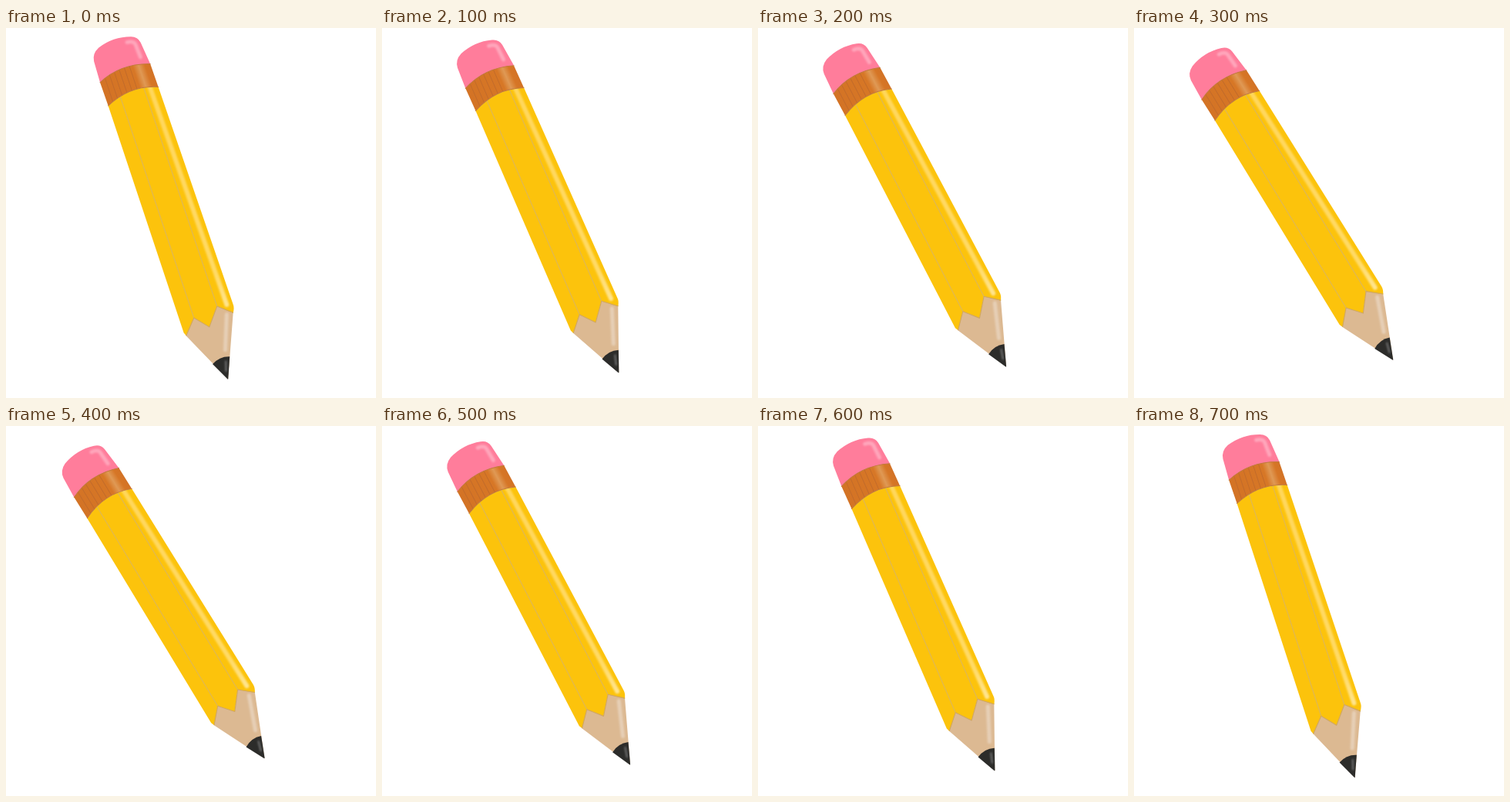
These frames come from a looping animation (480x480 px, 800 ms). An HTML page:

```html
<!DOCTYPE html>
<html lang="en">
<head>
<meta charset="utf-8">
<title>Pencil</title>
<style>
  html, body { margin: 0; width: 100%; height: 100%; overflow: hidden; background: #fff; }
  svg { display: block; width: 100%; height: 100%; }
</style>
</head>
<body>
<svg viewBox="0 0 480 480">
  <defs>
    <linearGradient id="shine" gradientUnits="userSpaceOnUse" x1="0" y1="-155" x2="0" y2="150">
      <stop offset="0" stop-color="#ffd75c"/>
      <stop offset=".85" stop-color="#ffda66"/>
      <stop offset="1" stop-color="#ffe591"/>
    </linearGradient>
    <linearGradient id="metal" gradientUnits="userSpaceOnUse" x1="-25" x2="46" y1="0" y2="0">
      <stop offset="0" stop-color="#d37325"/>
      <stop offset=".66" stop-color="#d77726"/>
      <stop offset=".77" stop-color="#df9955"/>
      <stop offset=".88" stop-color="#d67626"/>
      <stop offset="1" stop-color="#d27226"/>
    </linearGradient>
    <filter id="soft" filterUnits="userSpaceOnUse" x="-60" y="-250" width="140" height="510">
      <feGaussianBlur stdDeviation="1.2"/>
    </filter>
    <clipPath id="inBody"><use href="#body"/></clipPath>
    <clipPath id="inFerrule"><use href="#ferrule"/></clipPath>
  </defs>

  <!-- Drawn upright, with the pivot at the origin -->
  <g id="pencil" stroke-linecap="round" stroke-linejoin="round" fill="none">
    <path fill="#dcb992" d="M-24 168 L-6.8 149.6 L8.4 167.3 L26.4 145 L43.8 159 L9.8 239.3 Z"/>
    <path stroke="#e6cfb6" stroke-width="5" filter="url(#soft)" d="M35 159 L18.5 202"/>

    <path fill="#2c2c2a" d="M-3 214.2 Q9 207.4 21.2 212 L10.2 238.6 Q9.7 239.8 9.1 238.6 Z"/>
    <path stroke="#6b6b6b" stroke-width="2.4" filter="url(#soft)" d="M14.3 216.5 L10.8 228"/>

    <path id="body" fill="#fcc30c" d="M-24.4 -146.5 Q11 -163 45 -149 L47 150 Q47.2 154 43.4 160 L26.4 145 L8.4 167.3 L-6.8 149.6 L-23.6 168.6 L-25.5 164 Z"/>
    <g clip-path="url(#inBody)">
      <path stroke="#e0b850" stroke-width="1.3" d="M-5.8 -152 L-6.8 149.6 M26.7 -154 L26.4 145"/>
      <path stroke="url(#shine)" stroke-width="6" filter="url(#soft)" d="M34.5 -158 L39 147"/>
    </g>
    <path stroke="#d0a660" stroke-width="1.1" d="M-23.4 168 L-6.8 149.6 L8.4 167.3 L26.4 145 L43.4 159.4"/>

    <path fill="#ff7d9b" d="M-24.8 -178.5 L-23.6 -207 Q-22.5 -217.4 -12 -222 Q10 -229.6 32 -222.2 Q40.6 -219.4 41.6 -211 L44.6 -181 Q10 -180 -24.8 -178.5 Z"/>
    <path stroke="#ffa6bb" stroke-width="5" filter="url(#soft)" d="M25 -216.8 Q34 -216.4 34.5 -210.5 L35.4 -193"/>

    <path id="ferrule" fill="url(#metal)" d="M-24.8 -178.5 Q8 -193.6 44.6 -180.6 L45 -149 Q11 -163 -24.4 -146.5 Z"/>
    <g id="ridges" clip-path="url(#inFerrule)" stroke="#c26b2a" stroke-width="1"></g>
    <path stroke="#c07a3c" stroke-width="1" d="M-24.8 -178.5 Q8 -193.6 44.6 -180.6 M-24.4 -146.5 Q11 -163 45 -149"/>
  </g>
</svg>
<script>
  const PIVOT = [202.5, 232];
  const STEP = 100;
  const ANGLES = [18.6, 23.6, 27.6, 31.6, 31.4, 27.6, 23.6, 18.2];

  const pencil = document.getElementById("pencil");
  const ridges = document.getElementById("ridges");

  for (let x = -17; x <= 18; x += 7) {
    const line = document.createElementNS("http://www.w3.org/2000/svg", "path");
    line.setAttribute("d", `M${x} -192 V-142`);
    ridges.append(line);
  }

  function draw(time) {
    const pose = Math.floor(time / STEP) % ANGLES.length;
    pencil.setAttribute("transform", `translate(${PIVOT}) rotate(${-ANGLES[pose]})`);
  }

  let start;
  function tick(now) {
    start ??= now;
    draw(Math.max(0, now - start));
    requestAnimationFrame(tick);
  }

  draw(0);
  requestAnimationFrame(tick);
</script>
</body>
</html>
```
